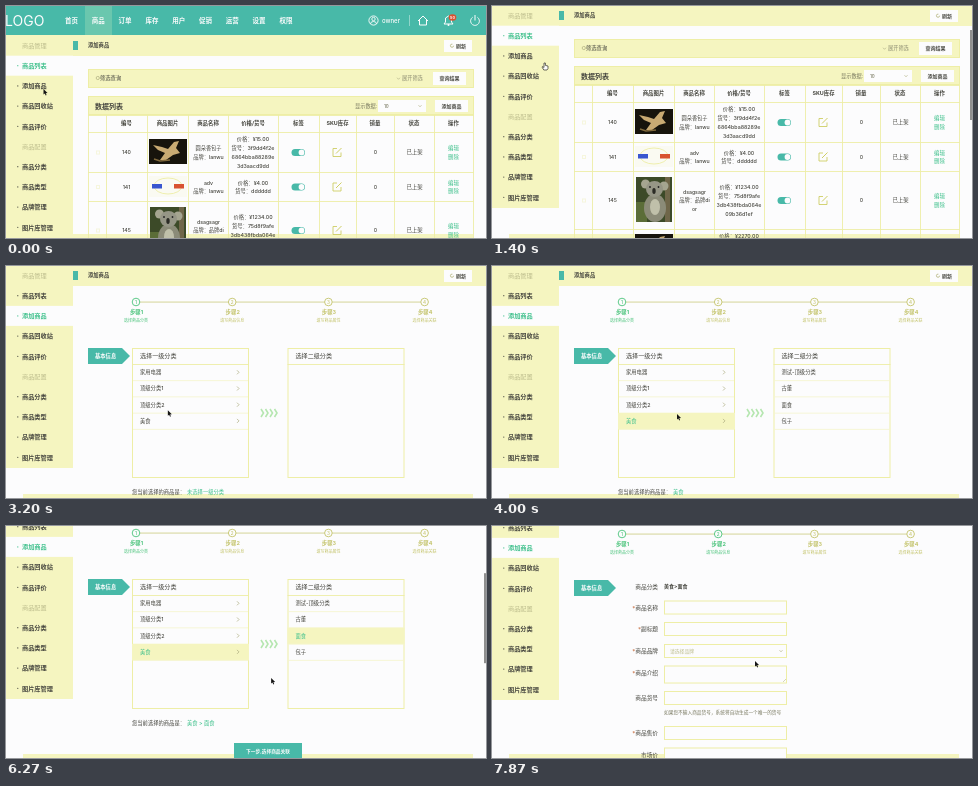
Recreate the animation shown at these times as an HTML page with a canvas. Size 480x232 px, loop 8000 ms.

```html
<!DOCTYPE html>
<html lang="zh-CN">
<head>
<meta charset="utf-8">
<style>
html, body { margin: 0; width: 100%; height: 100%; overflow: hidden; background: #fcfcfd; }
canvas { display: block; width: 480px; height: 232px; }
</style>
</head>
<body>
<canvas id="stage"></canvas>
<script>
const LOOP = 8000, W = 480, H = 232;
const TEAL = '#48b9a8', GREEN = '#3fc08c', PALE = '#f5f5c0', LINE = '#eeeea6',
  INK = '#45453e', MUTED = '#bcbc8c', WHITE = '#fcfcfd';
const FONT = 'Inter, "Noto Sans CJK SC", "Noto Sans CJK", sans-serif';
const OPEN_STEP = 1930, PICK_FIRST = 3500, PICK_SECOND = 4900, NEXT = 7050;

const canvas = document.getElementById('stage');
const ctx = canvas.getContext('2d');
const dpr = window.devicePixelRatio || 1;
canvas.width = W * dpr;
canvas.height = H * dpr;

// [time, value...] keys, eased between neighbours
function track(keys, t) {
  let i = 0;
  while (i < keys.length - 2 && t >= keys[i + 1][0]) i++;
  const a = keys[i], b = keys[i + 1];
  const p = Math.min(1, Math.max(0, (t - a[0]) / (b[0] - a[0])));
  const e = p * p * (3 - 2 * p);
  return a.slice(1).map((v, k) => v + (b[k + 1] - v) * e);
}
const scrollKeys = [[0, 0], [1020, 0], [1300, 30], [6110, 30], [6260, 59], [7040, 59], [7050, 58]];
const pointerKeys = [
  [0, 37.5, 83], [850, 114, 64], [1000, 114, 64], [1400, 53, 57], [1850, 33, 57.5], [2450, 33, 58],
  [3350, 172, 151], [4000, 185, 148], [4300, 185, 148], [4800, 300, 137], [5200, 300, 138],
  [6000, 266, 152], [6350, 265, 152], [6850, 262, 224], [7080, 262, 224], [7750, 263, 135], [8000, 263, 135]
];

function rect(x, y, w, h, fill, stroke) {
  if (fill) { ctx.fillStyle = fill; ctx.fillRect(x, y, w, h); }
  if (stroke) { ctx.strokeStyle = stroke; ctx.lineWidth = 1; ctx.strokeRect(x + .5, y + .5, w - 1, h - 1); }
}
function text(s, x, y, size = 5.3, color = INK, align = 'left', weight = 500) {
  ctx.font = `${weight} ${size}px ${FONT}`;
  ctx.textAlign = align;
  ctx.fillStyle = color;
  ctx.fillText(s, x, y + size * .37);
}
const center = (s, x, y, size, color, weight) => text(s, x, y, size, color, 'center', weight);
function path(points, stroke, width = 1, fill) {
  ctx.beginPath();
  points.forEach(([x, y], i) => i ? ctx.lineTo(x, y) : ctx.moveTo(x, y));
  if (fill) { ctx.closePath(); ctx.fillStyle = fill; ctx.fill(); }
  if (stroke) { ctx.strokeStyle = stroke; ctx.lineWidth = width; ctx.stroke(); }
}
function oval(x, y, rx, ry, fill, stroke, from = 0, to = 7) {
  ctx.beginPath();
  ctx.ellipse(x, y, rx, ry, 0, from, Math.min(to, from + Math.PI * 2));
  if (fill) { ctx.fillStyle = fill; ctx.fill(); }
  if (stroke) { ctx.strokeStyle = stroke; ctx.lineWidth = .9; ctx.stroke(); }
}
function at(x, y, draw) {
  ctx.save();
  ctx.translate(x, y);
  draw();
  ctx.restore();
}
const chevron = (x, y) => path([[x - 1, y - 2], [x + 1, y], [x - 1, y + 2]], '#a9a97c', .7);
const caret = (x, y) => path([[x - 1.5, y - .8], [x, y + .8], [x + 1.5, y - .8]], '#b5b58c', .7);

function header() {
  rect(0, 0, W, 29, TEAL);
  rect(79, 0, 27, 29, '#6ac7ae');
  text('LOGO', -1, 15, 14, WHITE, 'left', 400);
  '首页 商品 订单 库存 用户 促销 运营 设置 权限'.split(' ')
    .forEach((s, i) => center(s, 65.5 + 26.8 * i, 14.5, 6.5, WHITE, 700));
  oval(367.5, 14.5, 4.6, 4.6, null, WHITE);
  oval(367.5, 13, 1.7, 1.7, null, WHITE);
  oval(367.5, 18, 3, 2.5, null, WHITE, Math.PI, Math.PI * 2);
  text('owner', 376, 14.5, 6, WHITE);
  rect(403, 9, .8, 11, '#a4dcd2');
  path([[412, 15], [417, 10], [422, 15]], WHITE);
  path([[413.5, 14], [413.5, 19], [420.5, 19], [420.5, 14]], WHITE);
  path([[438, 18], [439.5, 16], [439.5, 12], [442.5, 10], [445.5, 12], [445.5, 16], [447, 18], [438, 18]], WHITE);
  oval(442.5, 19, 1, 1, WHITE);
  oval(446.5, 11.5, 3.8, 3.3, '#d9502f');
  center('50', 446.5, 11.5, 3.8, WHITE, 700);
  oval(469, 15, 4.4, 4.4, null, WHITE, -1, 4.15);
  path([[469, 9], [469, 14.5]], WHITE);
}

function sidebar(active) {
  rect(0, 29, 67, 203, PALE);
  '商品管理 商品列表 添加商品 商品回收站 商品评价 商品配置 商品分类 商品类型 品牌管理 图片库管理'.split(' ')
    .forEach((s, i) => {
      const y = 39.5 + 20.2 * i, title = i % 5 === 0;
      if (i === active) rect(0, y - 10, 67, 20, WHITE);
      const color = i === active ? GREEN : title ? MUTED : INK;
      if (!title) oval(11.8, y, .6, .6, color);
      text(s, 16, y, 6.2, color, 'left', title ? 500 : 700);
    });
}

function breadcrumb() {
  rect(67, 29, 413, 21, PALE);
  rect(67, 35, 5, 9, TEAL);
  text('添加商品', 82, 39.5, 5.3, INK, 'left', 700);
  rect(438, 34, 28, 12, WHITE);
  oval(446, 39.7, 1.6, 1.6, null, MUTED, 0, 5);
  text('刷新', 450, 39.7, 5, INK, 'left', 700);
}

function button(s, x, y, w, h) {
  rect(x, y, w, h, WHITE);
  center(s, x + w / 2, y + h / 2, 5, INK, 700);
}

const columns = [82, 100, 141, 182, 222, 272, 313, 350, 388, 428, 467];
const products = [
  [126, 166, '140', ['圆朵香包子', '品牌：lanwu'], ['价格：¥15.00', '货号：3f9dd4f2e', '6864bba88289e', '3d3aacd9dd']],
  [166, 195, '141', ['adv', '品牌：lanwu'], ['价格：¥4.00', '货号：dddddd']],
  [195, 253, '145', ['dsagsagr', '品牌：品牌di', 'or'], ['价格：¥1234.00', '货号：75d8f9afe', '3db438fbda064e', '09b36d1ef']],
  [253, 293, '146', ['测试商品', '品牌：lanwu'], ['价格：¥2270.00', '货号：8c1e07ab2', '51f0d94c7be23', 'a64e90b1f2']]
];

function birdPhoto(y) {
  rect(143, y, 38, 25, '#17140c');
  path([[147, y + 6], [156, y + 8], [162, y + 10], [168, y + 3], [173, y + 2], [170, y + 9],
    [174, y + 14], [167, y + 16], [160, y + 21], [154, y + 21], [159, y + 14], [152, y + 11]], null, 1, '#c9ab73');
  path([[148, y + 20], [154, y + 22], [164, y + 21]], '#80693c', 1.5);
}
const pictures = [
  () => birdPhoto(133),
  () => {
    rect(143, 170, 38, 21, '#fafaf2');
    oval(162, 180, 14, 8, null, LINE);
    rect(146, 178, 10, 4.5, '#3956cf');
    rect(168, 178, 10, 4.5, '#d8522f');
  },
  () => {
    rect(144, 201, 36, 45, '#3c4a28');
    rect(144, 226, 11, 20, '#5b6d38');
    rect(173, 201, 5, 45, '#6f6649');
    oval(163, 232, 11, 14, '#8b8b78');
    oval(153.5, 208, 4.5, 4.5, '#a5a590');
    oval(172, 210, 4.5, 4.5, '#a5a590');
    oval(162.5, 213, 8.5, 8, '#969686');
    oval(162, 215, 1.7, 3, '#2b2b25');
    oval(158, 211, .9, .9, '#222');
    oval(166.5, 211, .9, .9, '#222');
    oval(163, 231, 5, 8, '#c0c0aa');
  },
  () => birdPhoto(258)
];

function listPage() {
  rect(82, 63, 386, 19, PALE, LINE);
  oval(91.8, 72, 1.6, 1.6, null, MUTED);
  text('筛选查询', 94, 72.5, 5.3);
  caret(392.5, 72.5);
  text('展开筛选', 396, 72.5, 5.2, '#8a8a70');
  button('查询结果', 427, 66, 33, 13);

  rect(82, 90, 386, 19, PALE, LINE);
  text('数据列表', 89, 100, 7, INK, 'left', 700);
  text('显示数据:', 349, 100, 5.2, '#77775e');
  rect(372, 94, 48, 12, WHITE);
  text('10', 378, 100, 4.5, '#77775e');
  caret(414, 100);
  button('添加商品', 429, 94, 33, 12);

  columns.forEach(x => rect(x, 109, .9, 190, LINE));
  '编号 商品图片 商品名称 价格/货号 标签 SKU库存 销量 状态 操作'.split(' ')
    .forEach((s, i) => center(s, (columns[i + 1] + columns[i + 2]) / 2, 117.5, 5.4, INK, 700));
  rect(82, 109, 386, .9, LINE);
  rect(82, 126, 386, .9, LINE);

  products.forEach(([top, bottom, id, name, price], i) => {
    const y = (top + bottom) / 2 + .5;
    const lines = (list, x, size, color) =>
      list.forEach((s, k) => center(s, x, y + (k - (list.length - 1) / 2) * 8.8, size, color));
    rect(82, bottom, 386, .9, LINE);
    rect(90, y - 2, 4, 4, null, '#f6f6dd');
    center(id, 120.5, y, 5.2);
    pictures[i]();
    lines(name, 202.5, 5.2);
    lines(price, 247, 5.3);
    ctx.fillStyle = TEAL;
    ctx.beginPath();
    ctx.roundRect(285.5, y - 3.5, 13.5, 7, 3.5);
    ctx.fill();
    oval(295.5, y, 2.9, 2.9, WHITE);
    path([[331, y - 4], [327, y - 4], [327, y + 4], [335, y + 4], [335, y]], '#cfcf66', .9);
    path([[330, y + 1], [335.5, y - 4.5]], '#cfcf66', 1);
    center('0', 369.5, y, 5.2);
    center('已上架', 408.5, y, 5.4);
    lines(['编辑', '删除'], 447.5, 5.4, GREEN);
  });
}

function stepper(done) {
  rect(130, 65.6, 288, .9, '#cfcf8c');
  ['选择商品分类', '填写商品信息', '填写商品属性', '选择商品关联'].forEach((s, i) => {
    const x = 130 + 96.2 * i, color = i < done ? '#4cc47c' : '#c4c46c';
    oval(x, 66, 3.8, 3.8, WHITE, color);
    center(i + 1, x, 66, 4.6, color);
    center('步骤' + (i + 1), x + .5, 76.5, 5.4, color, 700);
    center(s, x, 84.5, 4, color);
  });
  path([[82, 112], [116, 112], [124, 120], [116, 128], [82, 128]], null, 1, TEAL);
  text('基本信息', 89, 120, 5.3, WHITE, 'left', 700);
}

function categoryBox(x, title, items, selected, arrows) {
  rect(x, 112, 117, 130, WHITE, LINE);
  text(title, x + 8, 120, 6.1);
  rect(x, 128, 117, .9, LINE);
  items.forEach((s, i) => {
    const y = 136.3 + 16.2 * i;
    if (i === selected) rect(x, y - 8, 117, 16.5, PALE);
    rect(x + 1, y + 8, 115, .8, '#f5f5cc');
    text(s, x + 8, y, 5.3, i === selected ? GREEN : INK);
    if (arrows) chevron(x + 106, y);
  });
}

function categoryPage(t) {
  const first = t >= PICK_FIRST, second = t >= PICK_SECOND;
  stepper(1);
  categoryBox(126, '选择一级分类', ['家用电器', '顶级分类1', '顶级分类2', '美食'], first ? 3 : -1, true);
  categoryBox(281.5, '选择二级分类', first ? ['测试-顶级分类', '古董', '面食', '包子'] : [], second ? 2 : -1, false);
  for (let x = 255; x < 270; x += 4.5)
    path([[x, 173], [x + 2.5, 177], [x, 181]], '#b5e6b0', 1.6);
  text('您当前选择的商品是：', 126, 256, 5.3);
  text(second ? '美食 > 面食' : first ? '美食' : '未选择一级分类', 181, 256, 5.3, GREEN);
  rect(228, 276, 68, 16, TEAL);
  center('下一步,选择商品关联', 262, 284, 4.7, WHITE, 700);
}

function formPage() {
  stepper(2);
  const field = (label, y, required, h = 14) => {
    text(label, 166, y, 5.7, INK, 'right');
    if (required) text('*', 163 - label.length * 5.7, y + .8, 6, '#c9764c');
    if (h) rect(172, y - 7, 123, h, WHITE, LINE);
  };
  at(0, 58, () => {
    field('商品分类', 60.5, false, 0);
    text('美食>面食', 172, 60.5, 5, INK, 'left', 700);
    field('商品名称', 81.5, true);
    field('副标题', 103, true);
    field('商品品牌', 125, true);
    text('请选择品牌', 178, 125, 4.8, MUTED);
    caret(289, 125);
    field('商品介绍', 146.5, true, 18);
    path([[291, 156], [294, 153]], MUTED, .6);
    field('商品货号', 172, false);
    text('如果您不输入商品货号，系统将自动生成一个唯一的货号', 172, 186, 4.7, '#77775e');
    field('商品售价', 207, true);
    field('市场价', 228.5, false);
  });
}

function pointer(t) {
  const [x, y] = track(pointerKeys, t);
  const hand = (t > 1250 && t < 2600) || (t > 6750 && t < NEXT);
  at(x, y, () => hand
    ? path([[-1, 0], [.4, 0], [.4, 2.4], [3, 3], [3, 5.5], [2, 7], [-1.2, 7], [-3, 4], [-2.5, 3.4], [-1, 4.5], [-1, 0]], '#44443a', .8, WHITE)
    : path([[0, 0], [0, 5.6], [1.3, 4.5], [2.2, 6.5], [3.1, 6.1], [2.2, 4.2], [4, 4]], null, 1, '#151515'));
}

function draw(t) {
  const [scroll] = track(scrollKeys, t);
  const onList = t < OPEN_STEP;
  ctx.setTransform(dpr, 0, 0, dpr, 0, 0);
  rect(0, 0, W, H, WHITE);
  rect(17, 228, 450, 4, PALE);
  at(0, -scroll, () => {
    header();
    sidebar(onList ? 1 : 2);
    breadcrumb();
    if (onList) listPage();
    else if (t < NEXT) categoryPage(t);
    else formPage();
  });
  if (!onList && t < 2650) {
    rect(0, 226, 61, 6, PALE);
    text('127.0.0.1:8020/mall/add.html', 1, 229.5, 3.8, '#88886f');
  }
  if ((t > 1020 && onList) || (t > 6110 && t < 7200))
    rect(478, 24 + (scroll - 30) * .8, 2, 90, '#8f8f8f');
  pointer(t);
}

function tick(now) {
  draw(now % LOOP);
  requestAnimationFrame(tick);
}
requestAnimationFrame(tick);
</script>
</body>
</html>
```
